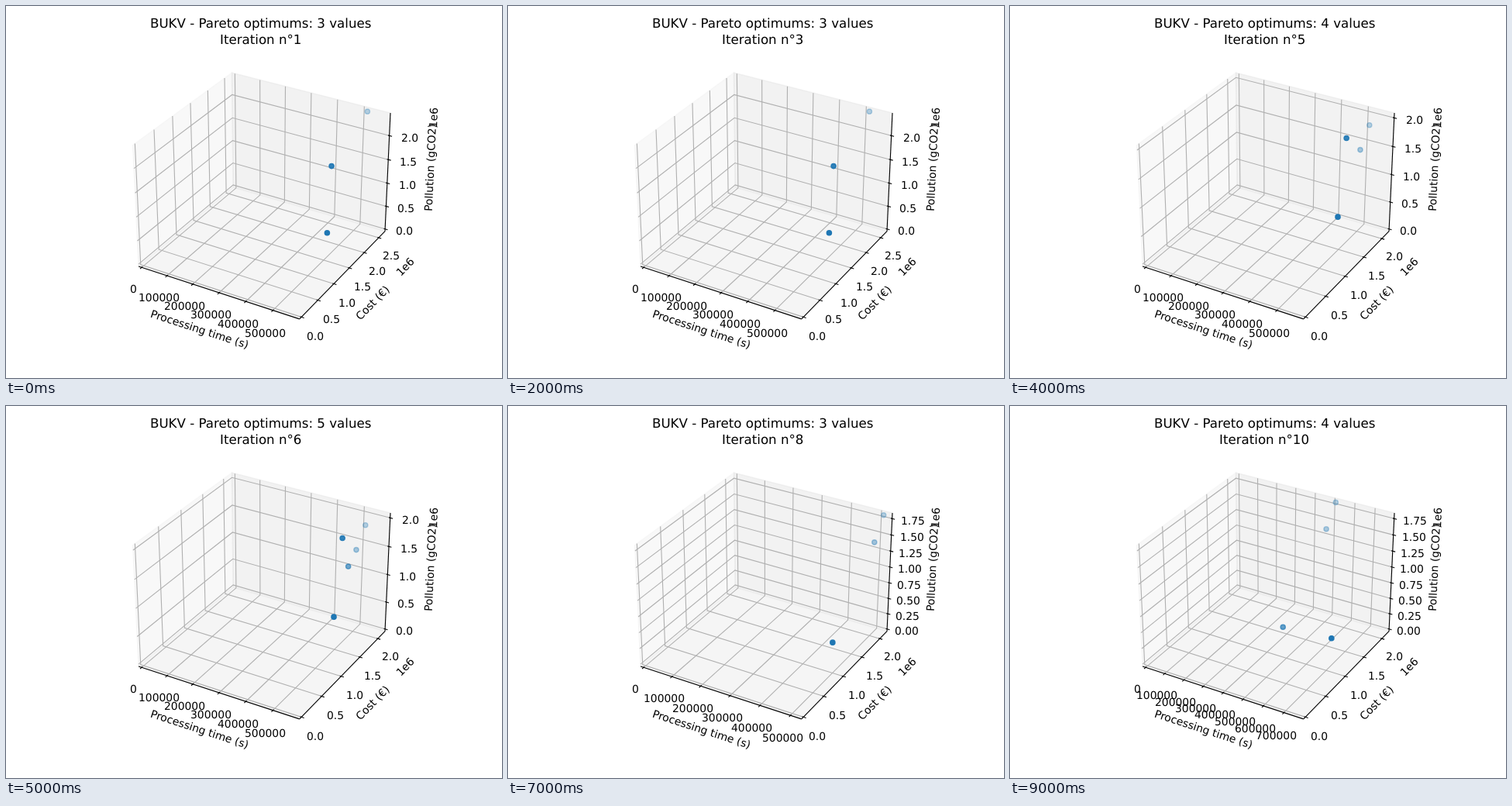
Write an HTML page with a canvas that moves like this. It is 640x480 px and loops after 10 s.

```html
<!DOCTYPE html>
<html lang="en">
<head>
<meta charset="utf-8">
<title>Pareto optimums</title>
<style>
  html, body { margin: 0; width: 100%; height: 100%; overflow: hidden; background: #fff; }
  canvas { display: block; width: 640px; height: 480px; }
</style>
</head>
<body>
<canvas id="stage" width="640" height="480"></canvas>
<script>
const ctx = document.getElementById('stage').getContext('2d');
const STEP = 1000, ITERATIONS = 10;
const BLUE = '31,119,180';
const NAMES = ['Processing time (s)', 'Cost (€)', 'Pollution (gCO2)'];

// Each solution: the iteration that finds it, and its time, cost and pollution.
const solutions = [
  { found: 1, values: [518e3, 2.667e6, 2.415e6] },
  { found: 1, values: [533e3, 1.392e6, 2.041e6] },
  { found: 1, values: [583.8e3, 0.8525e6, 1.095e6] },
  { found: 4, values: [515e3, 1.909e6, 1.514e6] },
  { found: 5, values: [512.5e3, 2.16e6, 1.798e6] },
  { found: 6, values: [537e3, 1.54e6, 1.473e6] },
  { found: 7, values: [524.7e3, 0.786e6, 0.611e6] },
  { found: 10, values: [778e3, 0.703e6, 0.726e6] }
];

// The solutions known so far that no other one beats on all three criteria.
function paretoFront(iteration) {
  const known = solutions.filter(s => s.found <= iteration).map(s => s.values);
  return known.filter(a => !known.some(b => b !== a && b.every((v, i) => v <= a[i])));
}

// Half sizes of the data box, and of the slightly larger drawn box.
const DATA = [4 / 7, 4 / 7, 3 / 7];
const BOX = DATA.map(h => h * 25 / 24);
const LABEL_OUT = 0.0864, TITLE_OUT = 0.1879; // distances from the box, in axis ranges

// Perspective view: 30 degrees up, -60 degrees around, ten units away.
const S = Math.sqrt(3) / 2;
const depth = ([x, y, z]) => 10 - (S / 2 * x - 0.75 * y + z / 2);

function project(p) {
  const [x, y, z] = p;
  const scale = 1997.84 / depth(p);
  return [333 + (S * x + y / 2) * scale, 237.4 - (-x / 4 + S / 2 * y + S * z) * scale];
}

// An axis runs from zero to its largest value with at most eight round steps.
function makeAxis(max) {
  const power = 10 ** Math.floor(Math.log10(max) - 1);
  const step = [1, 2, 2.5, 5, 10].map(k => k * power).find(s => max / s <= 8);
  const unit = max >= 1e6 ? 1e6 : 1;
  const decimals = (String(step / unit).split('.')[1] || '').length;
  const ticks = Array.from({ length: Math.floor(max / step) + 1 }, (_, i) => i * step);
  return { max, unit, decimals, ticks };
}

const place = (value, max, i) => (value / max * 2 - 1) * DATA[i];

// For each axis, the signs of the box edge that carries it.
const EDGES = [[0, -1, -1], [1, 0, -1], [1, 1, 0]];

function edgePoint(i, pos, out = 0) {
  return EDGES[i].map((sign, k) => k === i ? pos : sign * (BOX[k] + out * 2 * DATA[k]));
}

function trace(points) {
  ctx.beginPath();
  points.forEach(p => ctx.lineTo(...project(p)));
}

function line(points, color) {
  trace(points);
  ctx.strokeStyle = color;
  ctx.lineWidth = 1.11;
  ctx.stroke();
}

function fillAndStroke(color) {
  ctx.fillStyle = ctx.strokeStyle = color;
  ctx.lineWidth = 1.389;
  ctx.fill();
  ctx.stroke();
}

function pane(i, side, grey) {
  const [a, b] = [0, 1, 2].filter(k => k !== i);
  trace([[-1, -1], [1, -1], [1, 1], [-1, 1]].map(([u, v]) => {
    const p = [];
    p[i] = side * BOX[i];
    p[a] = u * BOX[a];
    p[b] = v * BOX[b];
    return p;
  }));
  ctx.closePath();
  fillAndStroke(`rgba(${grey},${grey},${grey},0.5)`);
}

function setFont(size) {
  ctx.font = `${size}px "DejaVu Sans", sans-serif`;
  ctx.textRendering = 'geometricPrecision';
  ctx.fillStyle = '#000';
}

function centered(text, x, baseline) {
  ctx.textAlign = 'left';
  ctx.fillText(text, Math.round(x - ctx.measureText(text).width / 2), Math.round(baseline));
}

function slanted(text, [x, y], angle, align) {
  ctx.save();
  ctx.translate(x, y);
  ctx.rotate(angle);
  ctx.textAlign = align;
  ctx.fillText(text, 0, 3.8);
  ctx.restore();
}

function gridPath(i, p) {
  const [X, Y, Z] = BOX;
  return [
    [[p, -Y, -Z], [p, Y, -Z], [p, Y, Z]],
    [[X, p, -Z], [-X, p, -Z], [-X, p, Z]],
    [[X, Y, p], [-X, Y, p], [-X, -Y, p]]
  ][i];
}

function drawGrid({ max, ticks }, i) {
  ticks.forEach(value => line(gridPath(i, place(value, max, i)), '#b0b0b0'));
}

function drawAxis({ max, unit, decimals, ticks }, i) {
  const ends = [-BOX[i], BOX[i]].map(p => edgePoint(i, p));
  line(ends, '#000');
  setFont(13.889);

  const across = i === 0 ? 1 : 0;
  for (const value of ticks) {
    const p = place(value, max, i);
    const mark = [0.2, -0.1].map(k => {
      const q = edgePoint(i, p);
      q[across] += EDGES[i][across] * k / 12 * 2 * DATA[across];
      return q;
    });
    line(mark, '#000');
    const [x, y] = project(edgePoint(i, p, LABEL_OUT));
    centered((value / unit).toFixed(decimals), x, y + 11);
  }

  const [[x1, y1], [x2, y2]] = ends.map(project);
  const angle = Math.atan2(y2 - y1, x2 - x1);
  slanted(NAMES[i], project(edgePoint(i, 0, TITLE_OUT)), angle, 'center');
  if (unit > 1) slanted('1e6', project(edgePoint(i, BOX[i], TITLE_OUT)), angle, 'right');
}

// Dots fade from opaque at the front to 30% at the back.
function drawDots(points) {
  const depths = points.map(depth);
  const near = Math.min(...depths), far = Math.max(...depths);
  points.forEach((p, k) => {
    ctx.beginPath();
    ctx.arc(...project(p), 3.106, 0, Math.PI * 2);
    fillAndStroke(`rgba(${BLUE},${1 - 0.7 * (depths[k] - near) / (far - near)})`);
  });
}

function draw(iteration) {
  const front = paretoFront(iteration);
  const axes = NAMES.map((_, i) => makeAxis(Math.max(...front.map(v => v[i]))));
  ctx.fillStyle = '#fff';
  ctx.fillRect(0, 0, 640, 480);

  pane(0, -1, 242);
  pane(1, 1, 230);
  pane(2, -1, 236);
  axes.forEach(drawGrid);
  axes.forEach(drawAxis);
  drawDots(front.map(values => values.map((v, i) => place(v, axes[i].max, i))));

  setFont(16.667);
  centered(`BUKV - Pareto optimums: ${front.length} values`, 328.4, 28);
  centered(`Iteration n°${iteration}`, 328.4, 49);
}

let shown = 0;
function tick() {
  const iteration = Math.floor(performance.now() / STEP) % ITERATIONS + 1;
  if (iteration !== shown) draw(shown = iteration);
  requestAnimationFrame(tick);
}
tick();
</script>
</body>
</html>
```
